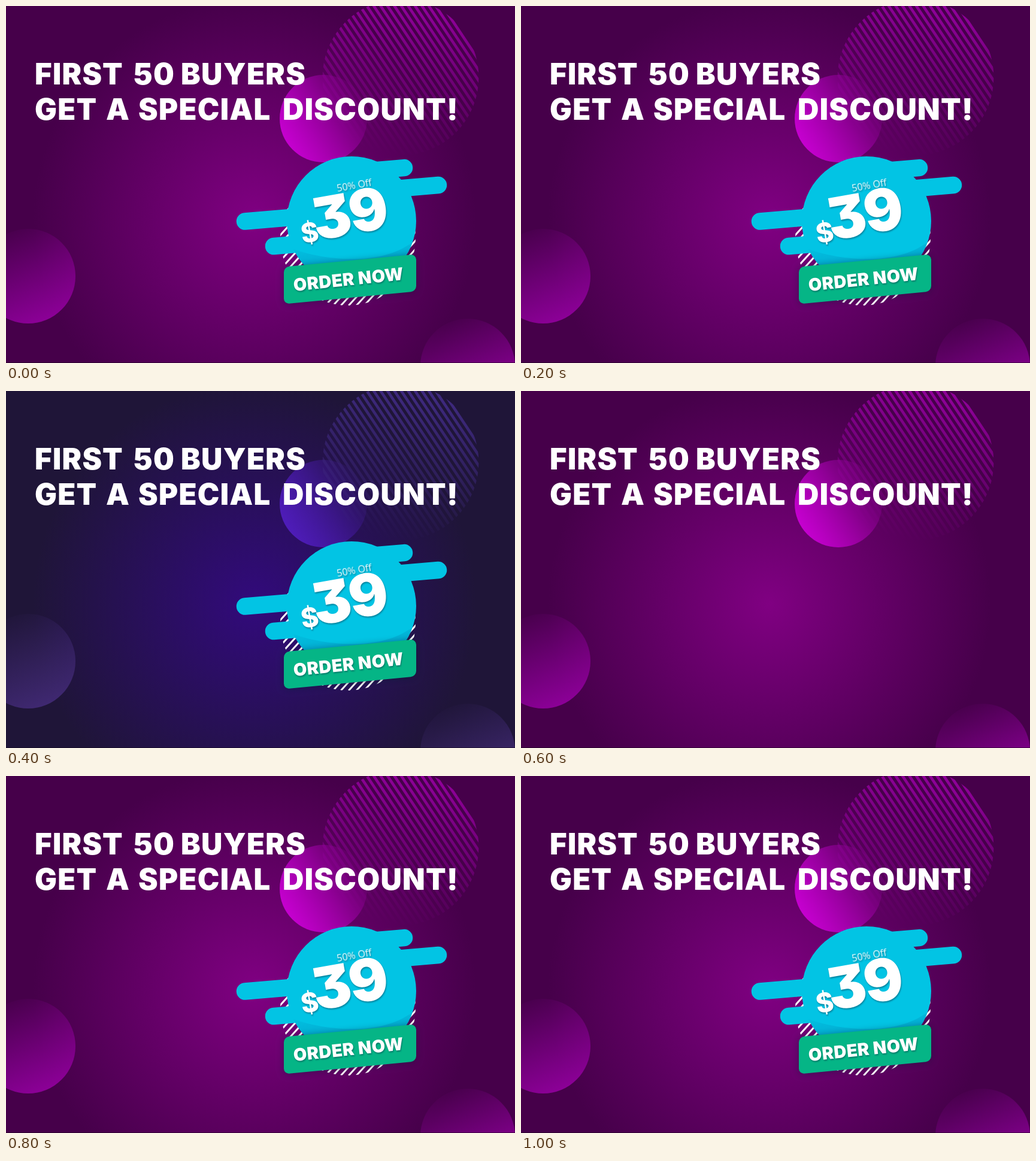
Write an HTML page with a canvas that moves like this. It is 850x596 px and loops after 1200 ms.

```html
<!DOCTYPE html>
<html lang="en">
<head>
<meta charset="utf-8">
<title>Special discount</title>
<style>
  html, body { margin: 0; width: 100%; height: 100%; overflow: hidden; background: #46004a; }
  canvas, svg { position: absolute; left: 0; top: 0; width: 850px; height: 596px; }
  text { fill: #fff; font-family: Inter, "Open Sans", sans-serif; font-weight: 900; }
  .title { font-size: 49px; letter-spacing: 1.3px; }
  .mid { text-anchor: middle; }
  .off { font: 400 16px "Open Sans", "Noto Sans", sans-serif; }
  .price { font-size: 97px; font-feature-settings: "cv09"; }
  .unit { font-size: 45px; font-weight: 800; }
  .order { font-size: 29px; letter-spacing: .5px; }
  #labels { filter: drop-shadow(1px 2px 1px rgba(0, 50, 70, .45)); }
</style>
</head>
<body>
<canvas id="stage" width="850" height="596"></canvas>
<svg viewBox="0 0 850 596">
  <text class="title" y="131"><tspan x="48">FIRST</tspan> <tspan x="213">50</tspan> <tspan x="292">BUYERS</tspan></text>
  <text class="title" y="190"><tspan x="48">GET</tspan> <tspan x="167">A</tspan> <tspan x="221">SPECIAL</tspan> <tspan x="462">DISCOUNT!</tspan></text>
  <g id="labels">
    <text class="mid off" transform="translate(582.5 305) rotate(-10)">50% Off</text>
    <text class="mid unit" transform="translate(510 394) rotate(-10)">$</text>
    <text class="mid price" transform="translate(550 386) rotate(-10)">3</text>
    <text class="mid price" transform="translate(611 374.5) rotate(-10)">9</text>
    <text class="mid order" transform="translate(573 466.5) rotate(-6)">ORDER NOW</text>
  </g>
</svg>
<script>
const W = 850, H = 596, LOOP = 1200;
const ctx = document.getElementById('stage').getContext('2d');
const labels = document.getElementById('labels');
const CYAN = '#02c4e4';

const PURPLE = { glow: '128,0,130', edge: '70,0,74', stripe: '146,0,156', ball: '196,0,206', side: '146,0,158' };
const BLUE = { glow: '50,10,124', edge: '31,21,56', stripe: '64,42,130', ball: '78,28,184', side: '66,42,118' };

function fade(x0, y0, x1, y1, rgb, a0, a1) {
  const g = ctx.createLinearGradient(x0, y0, x1, y1);
  g.addColorStop(0, `rgba(${rgb},${a0})`);
  g.addColorStop(1, `rgba(${rgb},${a1})`);
  return g;
}

function disc(x, y, r, fill) {
  ctx.fillStyle = fill;
  ctx.beginPath();
  ctx.arc(x, y, r, 0, Math.PI * 2);
  ctx.fill();
}

// Parallel lines clipped to a circle; slope is dy/dx, gap is horizontal
function stripes(x, y, r, slope, gap, width, paint) {
  ctx.save();
  ctx.beginPath();
  ctx.arc(x, y, r, 0, Math.PI * 2);
  ctx.clip();
  ctx.strokeStyle = paint;
  ctx.lineWidth = width;
  ctx.beginPath();
  const lean = r / slope;
  const n = Math.ceil((r + Math.abs(lean)) / gap);
  for (let i = -n; i <= n; i++) {
    ctx.moveTo(x + i * gap - lean, y - r);
    ctx.lineTo(x + i * gap + lean, y + r);
  }
  ctx.stroke();
  ctx.restore();
}

function bar(x0, y0, x1) {
  ctx.beginPath();
  ctx.moveTo(x0, y0);
  ctx.lineTo(x1, y0 - (x1 - x0) * 0.085);
  ctx.stroke();
}

function backdrop(c) {
  const g = ctx.createRadialGradient(415, 355, 0, 415, 355, 370);
  g.addColorStop(0, `rgb(${c.glow})`);
  g.addColorStop(1, `rgb(${c.edge})`);
  ctx.fillStyle = g;
  ctx.fillRect(0, 0, W, H);

  disc(530, 188, 73, fade(470, 225, 600, 150, c.ball, 1, 0));
  stripes(659, 119, 130.5, 1.5, 11.5, 4.6, fade(690, 5, 645, 248, c.stripe, 0.95, 0));
  disc(37, 451, 79, fade(10, 376, 70, 524, c.side, 0.05, 0.92));
  disc(771, 601, 79, fade(745, 526, 800, 660, c.side, 0.05, 0.95));

  ctx.fillStyle = 'rgba(20,10,25,.5)';
  ctx.fillRect(0, H - 1, W, 1);
}

function badge() {
  stripes(571, 387, 113, -1.1, 13, 3, '#fff');

  ctx.strokeStyle = CYAN;
  ctx.lineWidth = 28.5;
  ctx.lineCap = 'round';
  bar(399, 359.5, 520);
  bar(447, 401, 520);
  bar(590, 276.5, 665);
  bar(640, 306, 722);
  ctx.lineCap = 'butt';
  disc(577, 359, 108, CYAN);

  // Shade at the foot of the disc
  ctx.save();
  ctx.beginPath();
  ctx.arc(577, 359, 108, 0, Math.PI * 2);
  ctx.clip();
  ctx.fillStyle = fade(575, 392, 580, 436, '0,80,140', 0.03, 0.24);
  ctx.beginPath();
  ctx.moveTo(470, 402);
  ctx.bezierCurveTo(530, 427, 640, 437, 690, 384);
  ctx.lineTo(690, 480);
  ctx.lineTo(470, 480);
  ctx.fill();
  ctx.restore();

  ctx.save();
  ctx.transform(1, -0.095, 0, 1, 574.5, 456);
  ctx.shadowColor = 'rgba(0,30,50,.4)';
  ctx.shadowBlur = 12;
  ctx.shadowOffsetY = 1;
  ctx.fillStyle = '#05b586';
  ctx.beginPath();
  ctx.roundRect(-110.5, -31, 221, 62, 9);
  ctx.fill();
  ctx.restore();
}

function draw(now) {
  const t = now % LOOP;
  const blue = t >= 400 && t < 600;
  const shown = t < 600 || t >= 800;
  backdrop(blue ? BLUE : PURPLE);
  if (shown) badge();
  labels.style.visibility = shown ? 'visible' : 'hidden';
}

const start = performance.now();
function tick() {
  draw(performance.now() - start);
  requestAnimationFrame(tick);
}
tick();
</script>
</body>
</html>
```
